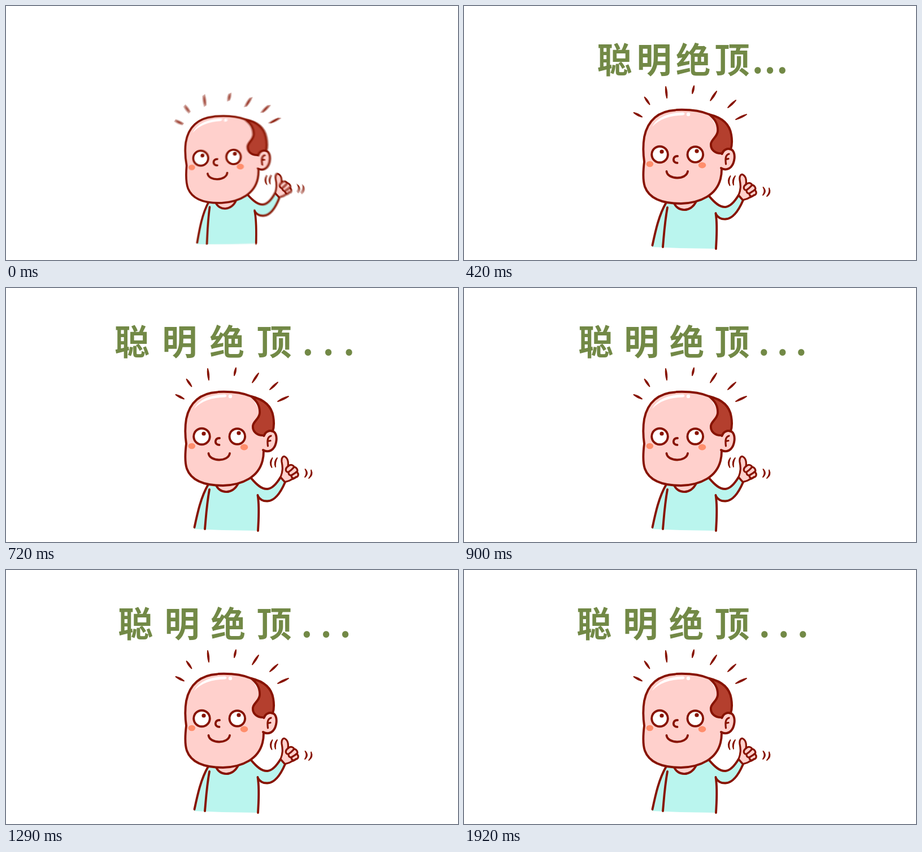
Write an HTML page that moves like this. It is 800 px wide and 450 px high and loops after 1.98 s.

```html
<!DOCTYPE html>
<html lang="zh">
<head>
<meta charset="utf-8">
<style>
  html, body { margin: 0; width: 100%; height: 100%; overflow: hidden; background: #fff; }
  svg { display: block; width: 100vw; height: 100vh; }
  .ink { fill: none; stroke: #871300; stroke-width: 3.9; stroke-linecap: round; stroke-linejoin: round; }
  .skin { fill: #ffd0cc; }
  .shirt { fill: #baf5ee; }
  .hair { fill: #b43f2e; }
  .white { fill: #fff; }
  .blush { fill: #ff8e6c; }
  .dark { fill: #871300; }
  .thin { stroke-width: 3.2; }
  .flick { fill: #871300; stroke: #871300; stroke-width: 1.9; stroke-linejoin: round; }
  #title {
    font: 900 62px "Noto Sans CJK SC", "Noto Sans CJK", "Noto Sans CJK JP", sans-serif;
    fill: #728946; text-anchor: middle;
  }
</style>
</head>
<body>
<svg viewBox="0 0 800 450">
  <defs>
    <g id="man">
      <rect class="white" x="-400" y="-400" width="1600" height="1400"/>
      <g id="flicks"></g>

      <!-- body -->
      <path class="shirt" d="M358 347C345 372 340 395 333 427Q390 430 446 430C447 410 449 388 446 369C452 377 458 379 466 376C477 372 486 360 494 344L485 335C478 348 470 356 460 356C450 355 441 347 434 337Z"/>
      <path class="ink skin" d="M371 347C377 366 402 366 411 346"/>
      <path class="ink" d="M358 348C345 370 339 398 333.500 424M360 357C355 385 354 405 352 427M445.500 367C449 388 447 410 446 430"/>
      <path class="ink" d="M434 337C444 349 453 357 463 356C472 355 480 345 486 335L494 344C485 365 475 377 463 377.500C455 378 449 374 446 369"/>

      <!-- hand -->
      <path class="ink skin thin" d="M486 335C490 325 490 318 488 308C487 300 491 297 494 299C499 302 500 309 499 316C503 312 508 313 510 317C515 318 517 323 515 326C519 330 517 335 513 335C510 339 506 338 504 340C500 343 496 342 494 344Z"/>
      <path class="ink thin" d="M499 316C493 320 495 327 500 326Q506 322 510 317M500 326C500 333 505 333 508 330Q512 328 515 325M505 332C505 338 510 338 513 335"/>

      <!-- head -->
      <path class="skin" d="M376 184C345 186 325 202 319 232C316 250 317 262 319 276C317 292 316 308 320 320C328 342 352 350 384 350C420 349 447 334 454 306L457 289L472 256L434 192C420 186 400 183 376 184Z"/>
      <path class="ink skin" d="M456.500 262C458 253 470 250 475.500 256C481 263 479 278 472.500 285C466 291 460 290 455 287"/>
      <path class="ink thin" d="M469 262C462 264 462.500 272 463.500 280M463 271.500L468 270.500"/>
      <path class="ink hair" d="M434 192C455 197 470 208 473 228C475 240 474 248 472 254C466 251 459 255 457 261C445 262 436 255 437 244C438 236 448 232 449 222C450 210 444 200 434 192Z"/>
      <path class="ink" d="M374 184.500C345 186 325 202 319 232C316 250 317 262 319 276C317 292 316 308 320 320C328 342 352 350 384 350C420 349 447 334 454 306Q456 298 456 289M376 184C400 183 420 186 434 192"/>
      <path class="white" d="M333 214C342 197 362 189 388 188.500Q393 191 388 193.500C364 194 346 200 333 214Z"/>
      <circle class="white" cx="397" cy="192" r="3.200"/>

      <!-- face -->
      <ellipse class="blush" cx="328.800" cy="280" rx="6.300" ry="5.300"/>
      <ellipse class="blush" cx="421.500" cy="282" rx="6.800" ry="5.400"/>
      <circle class="ink" style="fill:#fff" cx="346.500" cy="263" r="14.300"/>
      <circle class="ink" style="fill:#fff" cx="409.300" cy="263" r="13.800"/>
      <circle class="dark" cx="350" cy="258" r="3.600"/>
      <circle class="dark" cx="412" cy="257" r="3.600"/>
      <path class="ink" d="M378 266C369 265 368 278 377.500 278M358.500 293C360.500 308 393.500 308.500 396 293"/>
    </g>
  </defs>
  <g id="layers"></g>
  <text id="title" y="118.500">聪明绝顶...</text>
</svg>
<script>
const LOOP = 1980, STEP = 30, SHUTTER = 11, SAMPLES = 8;
const TITLE_START = 240, MOTION_END = 540;
const REST_X = [230, 312, 393.5, 474.5, 532, 566, 600];
const NS = "http://www.w3.org/2000/svg";
const byId = id => document.getElementById(id);

function add(parent, tag, attrs) {
  const el = document.createElementNS(NS, tag);
  for (const key in attrs) el.setAttribute(key, attrs[key]);
  return parent.appendChild(el);
}

// Tapered dash from one point to another; bend pushes its middle sideways.
function flick(x1, y1, x2, y2, width, bend = 0) {
  const dx = x2 - x1, dy = y2 - y1, len = Math.hypot(dx, dy);
  const side = k => `${(x1 + x2) / 2 - dy / len * k} ${(y1 + y2) / 2 + dx / len * k}`;
  add(byId("flicks"), "path", {
    class: "flick",
    d: `M${x1} ${y1}Q${side(bend + width)} ${x2} ${y2}Q${side(bend - width)} ${x1} ${y1}Z`
  });
}

[
  [300.5, 189, 315, 196.5], [319.5, 161.5, 328.5, 174.5], [357, 143, 359, 163],
  [407, 141.5, 404, 155], [447, 151, 436, 167.5], [481, 167, 467, 180], [500, 192, 481, 201]
].forEach(ray => flick(...ray, 2.2));
[
  [471.5, 301, 470.5, 318, 5], [480, 301, 477, 317, 4],
  [529.5, 321, 529, 335, -6], [540, 322.5, 536, 337, -5]
].forEach(([x1, y1, x2, y2, bend]) => flick(x1, y1, x2, y2, 1.4, bend));

// Each layer is opaque, so opacity 1/n yields an even average for motion blur.
const layers = Array.from({ length: SAMPLES }, (_, i) =>
  add(byId("layers"), "use", { href: "#man", opacity: 1 / (i + 1) }));

function pose(t) {
  const angle = (0.106 * t - 2.2) * Math.exp(-t / 60);
  const scale = 1 - 0.074 * Math.exp(-t / 50);
  return `translate(361 345) rotate(${angle}) scale(${scale}) translate(-361 -345)`;
}

function spread(t) {
  const age = t - 295;
  return -98 * Math.exp(-age * 0.0037) * Math.cos(2 * Math.PI * age / 356);
}

function draw(t) {
  const moving = t < MOTION_END;
  layers.forEach((layer, i) => {
    layer.style.display = moving || i === 0 ? "" : "none";
    const offset = ((i + 0.5) / SAMPLES - 0.5) * SHUTTER;
    layer.setAttribute("transform", moving ? pose(t + offset) : "");
  });
  const title = byId("title"), shift = spread(t) / 3;
  title.style.display = t < TITLE_START ? "none" : "";
  title.setAttribute("x", REST_X.map((x, i) => x + (3 - i) * shift).join(" "));
}

const start = performance.now();
function tick() {
  const t = (performance.now() - start) % LOOP;
  draw(Math.floor(t / STEP) * STEP);
  requestAnimationFrame(tick);
}
tick();
</script>
</body>
</html>
```
